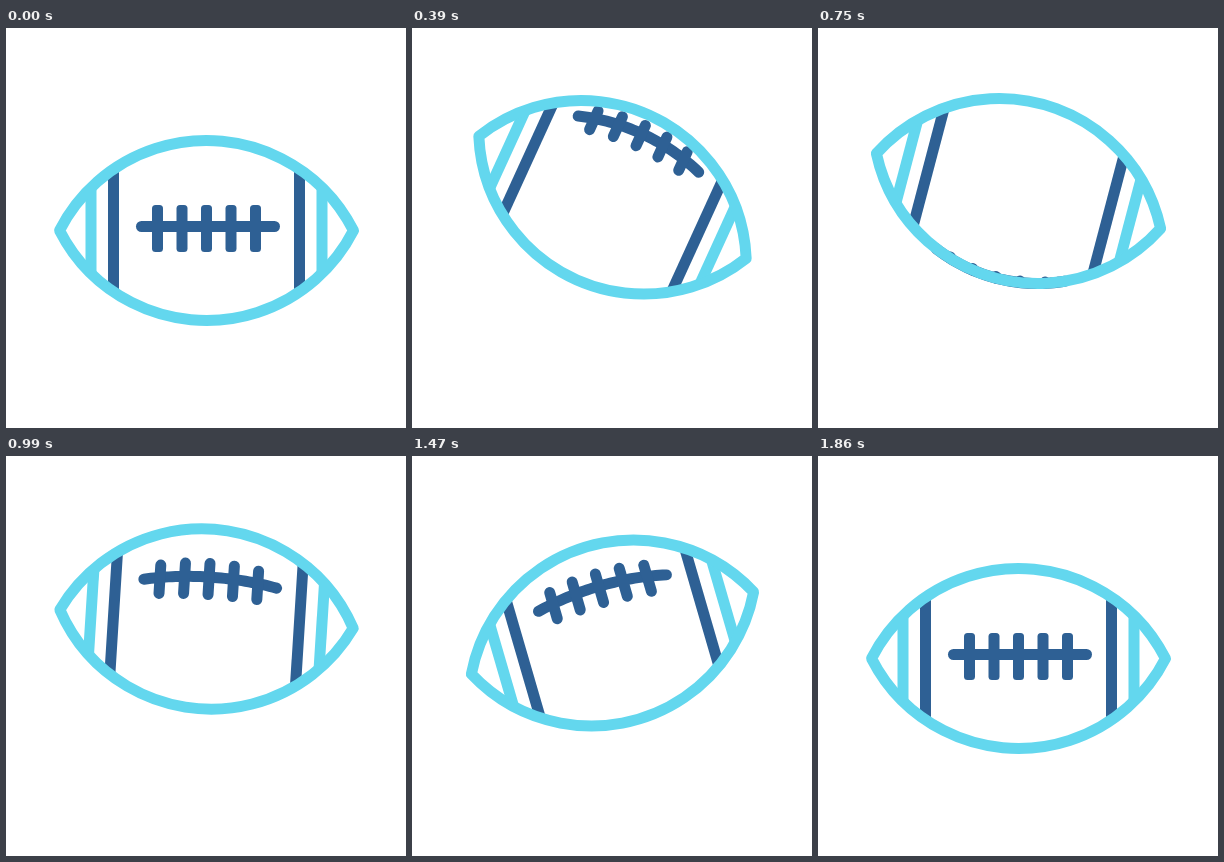
An HTML page with a canvas that plays this animation: 400x400 px, repeating every 1920 ms.

```html
<!DOCTYPE html>
<html>
<head>
<meta charset="utf-8">
<style>
html, body { margin: 0; width: 100%; height: 100%; overflow: hidden; background: #fff; }
canvas { display: block; }
</style>
</head>
<body>
<canvas id="stage" width="400" height="400"></canvas>
<script>
const ctx = document.getElementById('stage').getContext('2d');
const LOOP = 1920, STEP = 30, END = 1860;
const CYAN = '#63d7ee', BLUE = '#2e6094';
const TALL = 90, TURN = 540, LAST_TURN = 1375, REST = -4;

const part = (t, from, to) => Math.max(0, Math.min(1, (t - from) / (to - from)));
const easeOut = (x, p) => 1 - (1 - x) ** p;
const swing = x => (1 - Math.cos(Math.PI * x)) / 2;

// Toss: a quick rise, a pause, then a fall
const lift = t => 39.5 * (easeOut(part(t, 0, 750), 2.5) - part(t, 1150, END) ** 1.3);

// Kick to 25 degrees, a slow swing to the other side, then back to level
const tilt = t => 25 * easeOut(part(t, 0, 300), 3)
  - 44.3 * swing(part(t, 300, 1710)) + 19.3 * swing(part(t, 1710, END));

// Laces sweep down once per turn, and the last turn slows to rest
function sweep(t) {
  if (t === 0) return REST;
  if (t > LAST_TURN) return REST - 86 * (1 - part(t, LAST_TURN, END)) ** 3;
  return .467 * ((t + TURN / 2) % TURN - TURN / 2);
}

// Half height of the ball at distance x from its middle
const half = x => Math.sqrt(165 * 165 - x * x) - 75;

// Height on the round surface, with the roll kept on the visible side
function surface(x, roll) {
  const quarter = Math.PI / 2;
  return half(x) * Math.sin(Math.max(-quarter, Math.min(quarter, roll)));
}

function line(points, color, cap = 'round') {
  ctx.beginPath();
  for (const [x, y] of points) ctx.lineTo(x, y);
  ctx.strokeStyle = color;
  ctx.lineCap = cap;
  ctx.stroke();
}

function laces(y, flat) {
  if (Math.abs(y) > TALL + 9) return;
  const roll = Math.asin(Math.max(-1, Math.min(1, y / TALL)));
  const seam = [];
  for (let x = -65; x <= 68; x += 3.5) seam.push([x, flat ? y : surface(x, roll)]);
  line(seam, BLUE);
  for (let x = -49; x <= 49; x += 24.5) {
    if (flat) {
      ctx.fillStyle = BLUE;
      ctx.beginPath();
      ctx.roundRect(x - 5.5, y - 21.5, 11, 47, 3.5);
      ctx.fill();
    } else {
      line([[x, surface(x, roll - .18)], [x, surface(x, roll + .21)]], BLUE);
    }
  }
}

function bars(x, color) {
  for (const s of [-x, x]) line([[s, -half(x)], [s, half(x)]], color, 'butt');
}

function outline() {
  const tip = Math.acos(75 / 165), up = Math.PI / 2;
  ctx.beginPath();
  ctx.arc(0, 75, 165, -up - tip, -up + tip);
  ctx.arc(0, -75, 165, up - tip, up + tip);
  ctx.closePath();
  ctx.strokeStyle = CYAN;
  ctx.stroke();
}

function draw(t) {
  ctx.clearRect(0, 0, 400, 400);
  ctx.save();
  ctx.translate(200.5, 202.5 - lift(t));
  ctx.rotate(tilt(t) * Math.PI / 180);
  ctx.lineWidth = 11;
  ctx.lineJoin = 'round';
  laces(sweep(t), t === 0 || t === END);
  bars(93, BLUE);
  bars(115.5, CYAN);
  outline();
  ctx.restore();
}

function tick() {
  const t = performance.now() % LOOP;
  draw(Math.min(END, Math.floor(t / STEP) * STEP));
  requestAnimationFrame(tick);
}
tick();
</script>
</body>
</html>
```
